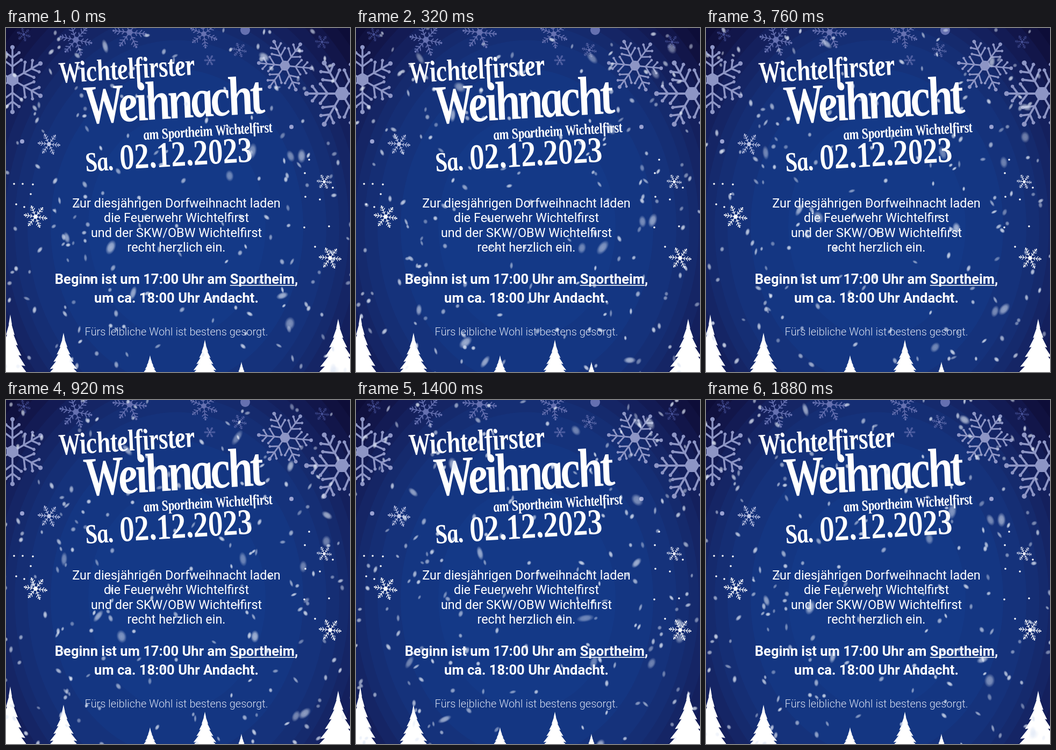
Animation, 640 px wide and 640 px high, one loop 1.92 s. Source, as an HTML page with a canvas:

```html
<!DOCTYPE html>
<html lang="de">
<head>
<meta charset="utf-8">
<title>Wichtelfirster Weihnacht</title>
<style>
html, body { margin: 0; width: 100%; height: 100%; overflow: hidden; background: #143a86; }
canvas { display: block; width: 640px; height: 640px; }
</style>
</head>
<body>
<canvas id="stage" width="640" height="640"></canvas>
<script>
const SIZE = 640, LOOP = 1920, STEP = 40, TAU = Math.PI * 2;
const ctx = document.getElementById('stage').getContext('2d');
const SCRIPT = '"Liberation Serif", Times, serif';
const SANS = 'Roboto, "Open Sans", sans-serif';

function makeLayer(size) {
  const c = document.createElement('canvas');
  c.width = c.height = size;
  return c;
}

function seeded(seed) {
  return () => {
    seed = (seed * 1664525 + 1013904223) >>> 0;
    return seed / 4294967296;
  };
}

function disc(g, x, y, r) {
  g.beginPath();
  g.arc(x, y, r, 0, TAU);
  g.fill();
}

function line(g, x1, y1, x2, y2) {
  g.beginPath();
  g.moveTo(x1, y1);
  g.lineTo(x2, y2);
  g.stroke();
}

// Night sky: tall nested ovals, darker towards the corners.
function drawSky(g) {
  const ovals = [[420, '#10113f'], [400, '#12164a'], [380, '#131b54'], [360, '#14205d'],
    [340, '#152565'], [320, '#152a6d'], [302, '#152e74'], [278, '#15327b'], [235, '#143682'],
    [165, '#143987']];
  g.fillStyle = '#0d0d38';
  g.fillRect(0, 0, SIZE, SIZE);
  for (const [r, color] of ovals) {
    g.fillStyle = color;
    g.beginPath();
    g.ellipse(318, 370, r, r * 1.25, 0, 0, TAU);
    g.fill();
  }
}

// Six arms; bold crystals have knobs, fine ones have more twigs.
function crystal(g, x, y, r, turn, color, bold) {
  g.save();
  g.translate(x, y);
  g.rotate(turn);
  g.strokeStyle = g.fillStyle = color;
  g.lineWidth = bold ? r * 0.055 : Math.max(0.9, r * 0.055);
  const twigs = bold ? [[0.38, 0.32], [0.64, 0.24]] : [[0.32, 0.2], [0.55, 0.26], [0.76, 0.18]];
  for (let i = 0; i < 6; i++) {
    g.rotate(TAU / 6);
    line(g, 0, 0, r * 0.95, 0);
    if (bold || r > 18) disc(g, r * 0.94, 0, r * 0.065);
    for (const [at, len] of twigs) {
      for (const side of [-1, 1]) {
        const ex = r * (at + len * 0.6), ey = side * r * len * 0.8;
        line(g, r * at, 0, ex, ey);
        if (bold) disc(g, ex, ey, r * 0.045);
      }
    }
  }
  g.beginPath();
  for (let i = 0; i < 6; i++) {
    const a = i * TAU / 6, c = r * 0.2;
    g.lineTo(c * Math.cos(a), c * Math.sin(a));
  }
  g.fill();
  g.restore();
}

function drawCrystals(g) {
  const lilac = '#8d95c5', dim = '#6570b0', faint = '#434d92', bright = '#c3c9e8';
  crystal(g, 12, 96, 64, TAU / 12, lilac, true);
  crystal(g, 519, 70, 52, 0.1, lilac, true);
  crystal(g, 625, 122, 70, 0, lilac, true);
  crystal(g, 130, 22, 31, 0.2, dim);
  crystal(g, 230, 8, 32, 0.1, dim);
  crystal(g, 368, 11, 27, 0.4, dim);
  crystal(g, 434, 41, 15, 0.2, dim);
  crystal(g, 379, 60, 11, 0, dim);
  crystal(g, 33, 12, 14, 0.3, faint);
  crystal(g, 588, 26, 14, 0.1, faint);
  crystal(g, 80, 216, 21, 0.1, bright);
  crystal(g, 55, 351, 22, 0.15, '#fff');
  crystal(g, 592, 286, 15, 0.1, '#eef0fa');
  crystal(g, 603, 428, 21, 0.1, '#fff');
  g.fillStyle = dim;
  disc(g, 445, 4, 9);
  g.fillStyle = '#9aa2d2';
  disc(g, 30, 211, 4);
  disc(g, 531, 184, 4);
  g.fillStyle = '#fff';
  const dots = [[15, 290], [31, 290], [50, 291], [46, 309], [19, 328], [34, 333], [564, 245],
    [556, 270], [608, 297], [557, 314], [584, 319], [601, 369], [555, 371], [575, 407]];
  for (const [x, y] of dots) disc(g, x, y, 1.8);
}

// Boughs widen faster towards the foot.
function tree(g, x, top, slope) {
  const depth = SIZE + 8 - top, tiers = 6;
  const edge = side => {
    const pts = [];
    for (let i = 1; i <= tiers; i++) {
      const d = depth * i / tiers, w = depth * slope * (i / tiers) ** 1.35;
      pts.push([x + side * w, top + d], [x + side * w * 0.74, top + d - 1]);
    }
    return pts;
  };
  g.beginPath();
  g.moveTo(x, top);
  for (const [px, py] of edge(1)) g.lineTo(px, py);
  for (const [px, py] of edge(-1).reverse()) g.lineTo(px, py);
  g.fill();
}

function drawTrees(g) {
  g.fillStyle = '#fff';
  tree(g, 8, 533, 0.31);
  tree(g, 107, 567, 0.4);
  tree(g, 268, 609, 0.42);
  tree(g, 370, 580, 0.4);
  tree(g, 438, 621, 0.36);
  tree(g, 618, 541, 0.4);
}

// Headline lettering: tall cursive forms set nearly upright on a rising line.
function lettering(g, text, x, y, size, gap) {
  g.save();
  g.translate(x, y);
  g.rotate(-0.06);
  g.transform(1, 0, 0.16, 1.22, 0, 0);
  g.font = `italic bold ${size}px ${SCRIPT}`;
  g.letterSpacing = gap + 'px';
  g.fillText(text, 0, 0);
  g.restore();
}

// Centres a line made of [text, weight, underlined] runs.
function centred(g, y, size, ...runs) {
  const setFont = weight => { g.font = `${weight} ${size}px ${SANS}`; };
  let total = 0;
  for (const [text, weight] of runs) {
    setFont(weight);
    total += g.measureText(text).width;
  }
  let x = 317 - total / 2;
  for (const [text, weight, under] of runs) {
    setFont(weight);
    const w = g.measureText(text).width;
    g.fillText(text, x, y);
    if (under) g.fillRect(x, y + 2.5, w, 1.5);
    x += w;
  }
}

function drawText(g) {
  g.fillStyle = '#fff';
  lettering(g, 'Wichtelfirster', 101, 102, 46, -0.4);
  lettering(g, 'Weihnacht', 150, 178, 84, -4.7);
  lettering(g, 'am Sportheim Wichtelfirst', 257, 208, 23, -0.4);
  lettering(g, 'Sa.', 150, 267, 42, -1);
  lettering(g, '02.12.2023', 215, 263, 55, 0);

  centred(g, 333.5, 23.4, ['Zur diesjährigen Dorfweihnacht laden', 400]);
  centred(g, 361, 23.4, ['die Feuerwehr Wichtelfirst', 400]);
  centred(g, 388.5, 23.4, ['und der SKW/OBW Wichtelfirst', 400]);
  centred(g, 416, 23.4, ['recht herzlich ein.', 400]);
  centred(g, 475.5, 25.6, ['Beginn ist um ', 600], ['17:00 Uhr', 700], [' am ', 600],
    ['Sportheim', 600, true], [',', 600]);
  centred(g, 510.5, 25.6, ['um ca. ', 600], ['18:00 Uhr Andacht.', 700]);
  g.fillStyle = '#dde3f1';
  centred(g, 572, 20, ['Fürs leibliche Wohl ist bestens gesorgt.', 300]);
}

const scene = makeLayer(SIZE);
{
  const g = scene.getContext('2d');
  drawSky(g);
  drawCrystals(g);
  drawTrees(g);
  drawText(g);
}

const puff = makeLayer(32);
{
  const g = puff.getContext('2d');
  const glow = g.createRadialGradient(16, 16, 0, 16, 16, 16);
  glow.addColorStop(0, 'rgba(224,232,246,1)');
  glow.addColorStop(0.5, 'rgba(224,232,246,.85)');
  glow.addColorStop(1, 'rgba(224,232,246,0)');
  g.fillStyle = glow;
  g.fillRect(0, 0, 32, 32);
}

function snow(x, y, w, h, angle, alpha) {
  ctx.save();
  ctx.translate(x, y);
  ctx.rotate(angle);
  ctx.globalAlpha = alpha;
  ctx.drawImage(puff, -w, -h, w * 2, h * 2);
  ctx.restore();
}

const rnd = seeded(2412);
const between = (a, b) => a + rnd() * (b - a);
const FALL = 720;

// Distant snow: flakes follow each other down a swaying path,
// and each reaches the next one's place when the loop ends.
const paths = Array.from({ length: 84 }, () => ({
  x: between(-20, 660),
  shift: rnd(),
  count: 2 + Math.floor(rnd() * 2.4),
  slope: between(-0.12, 0.2),
  sway: between(6, 26),
  phase: between(0, TAU),
  w: between(2.6, 4.6),
  h: between(4.2, 7.6),
  tilt: between(-0.5, 0.9),
  alpha: between(0.45, 0.88)
}));

// Near flakes: x, y, the moment they pass there, pixels per second.
const near = [
  [113, 390, 0, 420], [195, 408, 0, 553], [528, 550, 0, 700], [550, 238, 0, 375],
  [416, 275, 0, 420], [180, 162, 320, 400], [533, 360, 320, 380], [555, 190, 600, 375],
  [440, 168, 600, 400], [215, 440, 920, 550], [463, 440, 920, 420], [600, 368, 1200, 375],
  [103, 408, 1200, 400], [525, 228, 1200, 375], [605, 500, 1600, 420], [233, 365, 1600, 400],
  [457, 50, 1600, 560], [430, 70, 920, 700]
].map(([x, y, at, speed]) => ({
  x, y, at, speed,
  drift: between(-0.06, 0.08),
  w: between(5.5, 8.5) * (speed > 500 ? 1.25 : 1),
  h: between(10, 14) * (speed > 500 ? 1.2 : 1),
  tilt: between(-0.5, 0.6),
  alpha: between(0.45, 0.72)
}));

function draw(ms) {
  const t = ms / LOOP;
  ctx.drawImage(scene, 0, 0);
  for (const p of paths) {
    for (let k = 0; k < p.count; k++) {
      const y = (k + (p.shift + t) % 1) * FALL / p.count;
      const swing = p.phase + y / FALL * TAU * 1.6;
      const x = p.x + p.slope * (y - FALL / 2) + p.sway * Math.sin(swing);
      snow(x, y - 40, p.w, p.h, p.tilt + 0.7 * Math.sin(swing * 1.7), p.alpha);
    }
  }
  for (const f of near) {
    const span = f.speed * LOOP / 1000;
    const moved = f.y + 40 + f.speed * (ms - f.at) / 1000;
    const y = ((moved % span) + span) % span - 40;
    const x = f.x + f.drift * (y - f.y);
    snow(x, y, f.w, f.h, f.tilt + (y - f.y) * 0.0025, f.alpha);
  }
}

const start = performance.now();
function tick() {
  const ms = (performance.now() - start) % LOOP;
  draw(Math.floor(ms / STEP) * STEP);
  requestAnimationFrame(tick);
}
tick();
</script>
</body>
</html>
```
